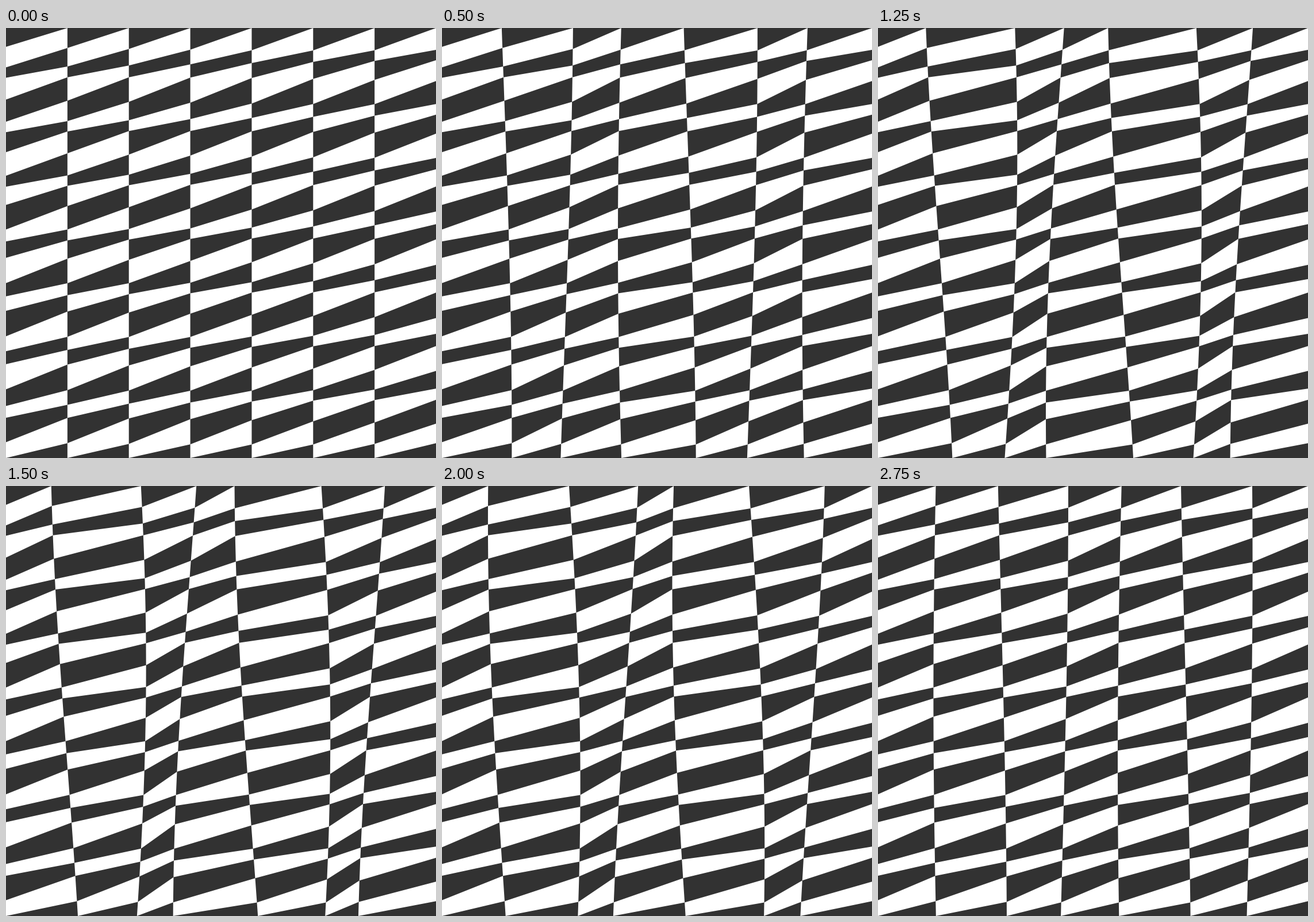
Animation of 748 by 748 pixels, one loop 3000 ms. Source, as an HTML page with a canvas:

```html
<!DOCTYPE html>
<html lang="en">
<head>
<meta charset="utf-8">
<title>Swaying stripes</title>
<style>
  html, body { margin: 0; width: 100%; height: 100%; overflow: hidden; background: #fff; }
  canvas { display: block; width: 748px; height: 748px; }
</style>
</head>
<body>
<canvas id="stage" width="748" height="748"></canvas>
<script>
const SIZE = 748, COLS = 7, ROWS = 24;
const LOOP = 3000, STEP = 250;
const CELL_W = SIZE / COLS, CELL_H = SIZE / ROWS;
const SWAY = 30, RATE = 1.0134, BEND = 0.0025;
const ctx = document.getElementById("stage").getContext("2d");

// Grid point at a column line and row; the outer border stays on the stage edge.
function point(col, row, angle) {
  row = Math.max(0, Math.min(ROWS, row));
  let x = col * CELL_W, y = row * CELL_H;
  if (row > 0 && row < ROWS) {
    y += CELL_H / 4 * Math.sin(2.011 * row + BEND * x - 1.79);
  }
  if (col > 0 && col < COLS) {
    x += SWAY * Math.sin(angle) * Math.sin(2 * col + BEND * y - 1.7 - angle);
  }
  return [x, y];
}

function draw(ms) {
  const angle = RATE * ms / 1000;
  ctx.fillStyle = "#fff";
  ctx.fillRect(0, 0, SIZE, SIZE);
  ctx.fillStyle = "#323232";
  ctx.beginPath();
  for (let col = 0; col < COLS; col++) {
    // Each dark cell climbs one row from its left side to its right side.
    for (let row = 0; row <= ROWS; row += 2) {
      ctx.moveTo(...point(col, row, angle));
      ctx.lineTo(...point(col + 1, row - 1, angle));
      ctx.lineTo(...point(col + 1, row, angle));
      ctx.lineTo(...point(col, row + 1, angle));
      ctx.closePath();
    }
  }
  ctx.fill();
}

const start = performance.now();
function tick() {
  const t = (performance.now() - start) % LOOP;
  draw(Math.floor(t / STEP) * STEP);
  requestAnimationFrame(tick);
}
tick();
</script>
</body>
</html>
```
